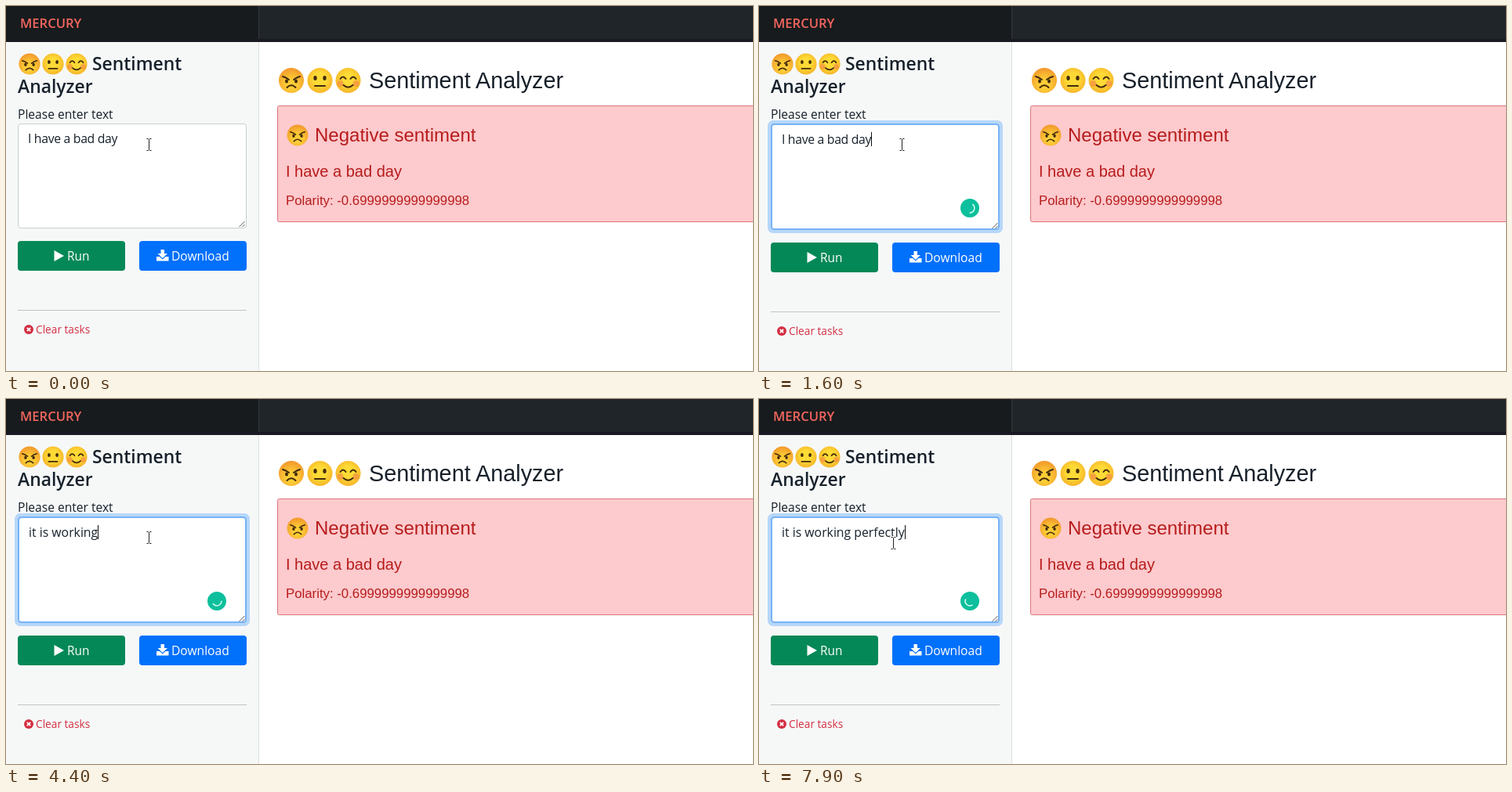
Animation of 953x466 px, one loop 8000 ms. Source, as an HTML page:

```html
<!DOCTYPE html>
<html lang="en">
<head>
<meta charset="utf-8">
<title>Sentiment Analyzer</title>
<style>
  html, body { margin: 0; width: 100%; height: 100%; overflow: hidden; background: #fff; }
  svg { display: block; width: 100%; height: 100%; }
  text { white-space: pre; }
  .ui { font: 15.8px "Open Sans", "Noto Sans", sans-serif; fill: #17212b; }
  .ui .title { font-size: 22.9px; font-weight: 600; }
  .ui .brand { font-size: 16.6px; font-weight: 600; fill: #f4665f; }
  .ui .small { font-size: 13.7px; fill: #d32f41; }
  .ui .light { fill: #fff; }
  .result { font-family: "Liberation Sans", Arial, sans-serif; fill: #b71c1c; }
  .face path { fill: none; stroke: #422b0d; stroke-width: 2; stroke-linecap: round; }
  .face ellipse { fill: #422b0d; }
</style>
</head>
<body>
<svg viewBox="0 0 953 466" preserveAspectRatio="none">
  <defs>
    <radialGradient id="yellow" cx=".5" cy=".45" r=".55">
      <stop offset=".45" stop-color="#fdda35"/><stop offset="1" stop-color="#f6b52a"/>
    </radialGradient>
    <radialGradient id="amber" cx=".5" cy=".65" r=".68">
      <stop offset=".3" stop-color="#fccd36"/><stop offset="1" stop-color="#f1932b"/>
    </radialGradient>
    <g id="angry" class="face">
      <circle r="16" fill="url(#amber)"/>
      <path d="M-11-5Q-7-4-3-1M11-5Q7-4 3-1M-5.5 9Q0 3.5 5.5 9"/>
      <ellipse cx="-6" cy="1" rx="2" ry="2.6"/><ellipse cx="6" cy="1" rx="2" ry="2.6"/>
    </g>
    <g id="neutral" class="face">
      <circle r="16" fill="url(#yellow)"/>
      <path d="M-6.5 7H6.5"/>
      <ellipse cx="-6" cy="-3" rx="2.2" ry="3"/><ellipse cx="6" cy="-3" rx="2.2" ry="3"/>
    </g>
    <g id="happy" class="face">
      <circle r="16" fill="url(#yellow)"/>
      <g fill="#f58b47" opacity=".65"><circle cx="-10" cy="4" r="4"/><circle cx="10" cy="4" r="4"/></g>
      <path d="M-10-2Q-6.5-7-3-2M10-2Q6.5-7 3-2M-6 6Q0 11.5 6 6"/>
    </g>
  </defs>

  <rect width="953" height="466" fill="#fff"/>
  <rect y="46" width="322" height="420" fill="#f6f8f8"/>
  <rect x="322" y="46" width="1" height="420" fill="#dcdfe0"/>
  <rect width="953" height="46" fill="#1f2528"/>
  <rect width="322" height="46" fill="#171b1d"/>
  <rect x="322" width="1" height="46" fill="#33393c"/>
  <rect y="42" width="953" height="4" fill="#1b1924"/>

  <g class="ui">
    <text class="brand" x="18" y="28">MERCURY</text>
    <use href="#angry" transform="translate(30 74) scale(.85)"/>
    <use href="#neutral" transform="translate(60 74) scale(.85)"/>
    <use href="#happy" transform="translate(90 74) scale(.85)"/>
    <text class="title" x="110" y="82">Sentiment</text>
    <text class="title" x="15" y="111">Analyzer</text>
    <text x="15" y="144" font-size="15.6">Please enter text</text>

    <rect id="ring" x="11" y="146" width="300" height="144" rx="7" fill="#b7d7f9"/>
    <rect id="field" fill="#fff" rx="3.5"/>
    <rect id="selection" x="29" y="158" height="23" fill="#3390ff"/>
    <text id="typed"></text>
    <rect id="caret" y="161" width="1" height="18" fill="#111"/>
    <g id="loader">
      <circle cx="269" cy="258" r="12" fill="#0dbf9c"/>
      <path id="arc" d="M274.6 260A6 6 0 0 1 263.4 260" fill="none" stroke="#d9fff4" stroke-width="1.5" stroke-linecap="round"/>
    </g>

    <g id="lower">
      <path d="M297.5 282L304.5 275M301.5 282L304.5 279" stroke="#555" fill="none"/>
      <rect x="15" y="300" width="137" height="38" rx="4" fill="#048857"/>
      <path d="M61.5 312V326L74 319Z" fill="#fff"/>
      <text class="light" x="78" y="325" font-size="15.4">Run</text>
      <rect x="170" y="300" width="137" height="38" rx="4" fill="#0170fb"/>
      <path d="M197.5 311H202V316H206L199.8 322L193.5 316H197.5ZM192 320H196L199.8 323.5L203.5 320H207.5V325.5H192Z" fill="#fff"/>
      <text class="light" x="211" y="325" font-size="15.6">Download</text>
      <rect x="15" y="388" width="292" height="1" fill="#bfc3c5"/>
      <circle cx="29" cy="413" r="6" fill="#d32f41"/>
      <path d="M26.8 410.8L31.2 415.2M31.2 410.8L26.8 415.2" stroke="#fff" stroke-width="1.8"/>
      <text class="small" x="38" y="418">Clear tasks</text>
    </g>
  </g>

  <g class="result">
    <use href="#angry" transform="translate(364 95)"/>
    <use href="#neutral" transform="translate(400.5 95)"/>
    <use href="#happy" transform="translate(436.5 95)"/>
    <text x="463" y="105" font-size="28.8" fill="#17202a">Sentiment Analyzer</text>
    <rect x="346.5" y="127.5" width="620" height="148" rx="2" fill="#fdcacd" stroke="#d9777c"/>
    <use href="#angry" transform="translate(372 165) scale(.84)"/>
    <text x="394" y="173" font-size="24">Negative sentiment</text>
    <text x="357" y="218" font-size="20">I have a bad day</text>
    <text x="357" y="254" font-size="16.8">Polarity: -0.6999999999999998</text>
  </g>

  <g id="pointer" fill="none">
    <path id="beam" d="M-3-7.5H-1L0-6.5L1-7.5H3M0-6.5V6.5M-3 7.5H-1L0 6.5L1 7.5H3" stroke="#fff" stroke-width="3"/>
    <use href="#beam" style="stroke:#111;stroke-width:1"/>
    <path d="M-3-7.5H-1L0-6.5L1-7.5H3M0-6.5V6.5M-3 7.5H-1L0 6.5L1 7.5H3" stroke="#222"/>
  </g>
</svg>
<script>
const LOOP = 8000, TICK = 100;
const FOCUS = 500, LOADER = 600, SELECT = 1900;
const OLD_TEXT = "I have a bad day";
const NEW_TEXT = "it is working perfectly";
// One key press per letter of NEW_TEXT, in ticks
const KEYS = [24, 25, 27, 28, 29, 30, 33, 37, 39, 41, 42, 43, 44, 46, 47, 49, 51, 62, 64, 65, 67, 72, 75];
const SPIN = [[0, -240], [900, 0], [2400, 620], [3400, 1040], [5500, 1845], [6800, 2180], [7900, 2560]];
const MOVE = [[7600, 0], [7900, 1]];

const el = id => document.getElementById(id);
const set = (id, attrs) => {
  for (const key in attrs) el(id).setAttribute(key, attrs[key]);
};
const show = (id, on) => set(id, { visibility: on ? "visible" : "hidden" });

function sample(points, t) {
  const next = points.findIndex(p => p[0] > t);
  if (next === 0) return points[0][1];
  if (next < 0) return points[points.length - 1][1];
  const [t0, v0] = points[next - 1], [t1, v1] = points[next];
  return v0 + (v1 - v0) * (t - t0) / (t1 - t0);
}

function draw(t) {
  const focused = t >= FOCUS;
  const count = KEYS.filter(k => k * TICK <= t).length;
  const selected = t >= SELECT && !count;
  const lastKey = count ? KEYS[count - 1] * TICK : FOCUS;

  show("ring", focused);
  set("field", focused
    ? { x: 16, y: 151, width: 290, height: 134, stroke: "#77b3f6", "stroke-width": 2 }
    : { x: 15.5, y: 150.5, width: 291, height: 133, stroke: "#c8cdd2", "stroke-width": 1 });
  set("lower", { transform: `translate(0 ${focused ? 2 : 0})` });

  el("typed").textContent = count ? NEW_TEXT.slice(0, count) : OLD_TEXT;
  set("typed", {
    x: focused ? 29 : 28,
    y: focused ? 176 : 175,
    style: `letter-spacing:${count ? 0 : -0.33}px;fill:${selected ? "#fff" : "#17212b"}`
  });
  const width = el("typed").getComputedTextLength();
  set("selection", { width });
  show("selection", selected);
  set("caret", { x: Math.round(29 + width) });
  show("caret", focused && !selected && (t - lastKey) % 1000 <= 500);

  show("loader", t >= LOADER);
  set("arc", { transform: `rotate(${sample(SPIN, t)} 269 258)` });

  const move = sample(MOVE, t);
  set("pointer", { transform: `translate(${Math.round(182 - 11 * move) + .5} ${Math.round(177 + 7 * move)})` });
}

const start = performance.now();
let shown = -1;
function frame() {
  const elapsed = (performance.now() - start) % LOOP;
  const t = Math.floor(elapsed / TICK) * TICK;
  if (t !== shown) draw(shown = t);
  requestAnimationFrame(frame);
}
frame();
</script>
</body>
</html>
```
